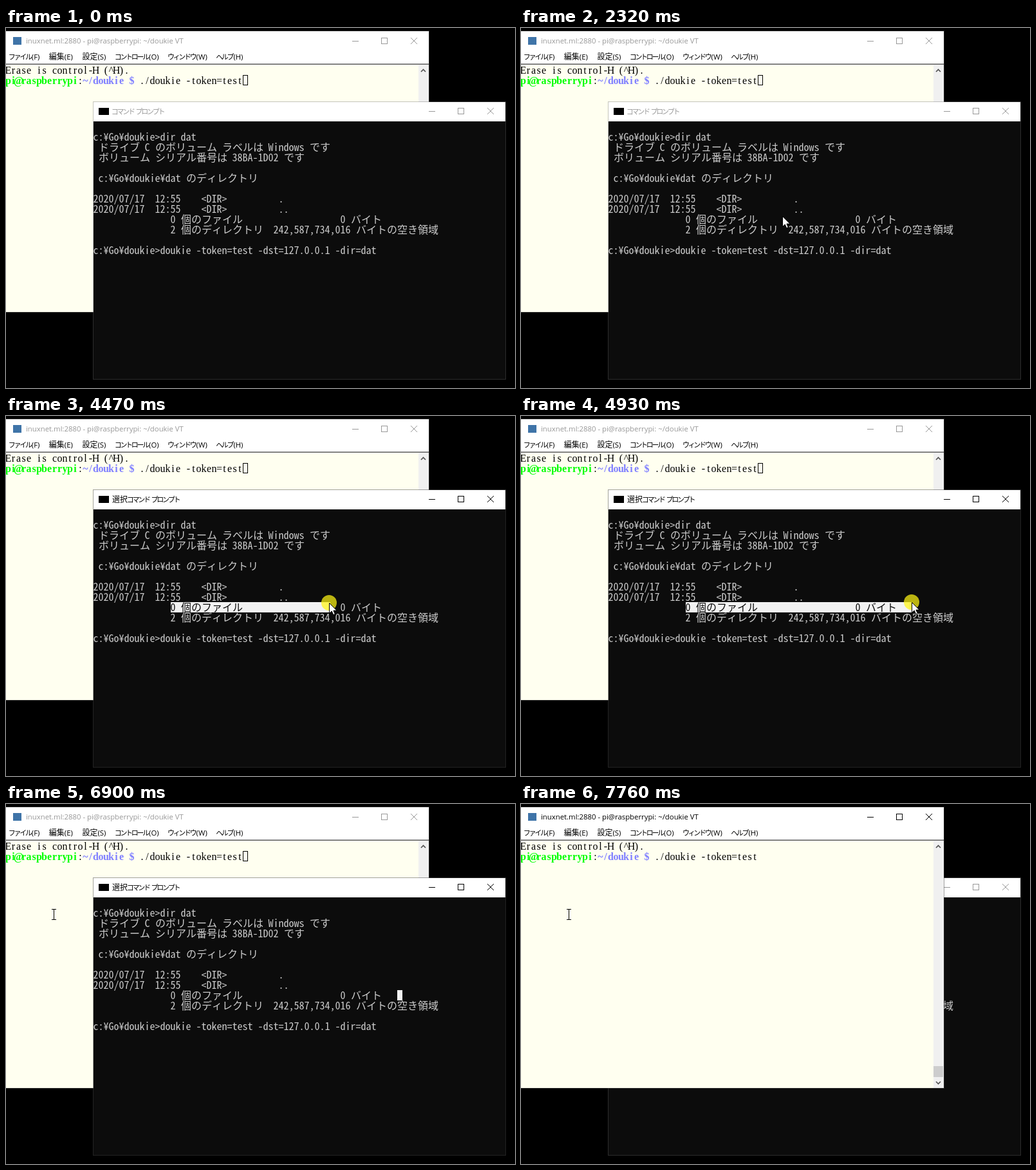
An HTML page with a canvas for the animation above (8 s loop, 791 by 559 pixels).

```html
<!DOCTYPE html>
<html lang="ja">
<head>
<meta charset="utf-8">
<title>Terminal windows</title>
<style>
html, body { margin: 0; height: 100%; overflow: hidden; background: #000; }
canvas { display: block; }
</style>
</head>
<body>
<canvas id="stage" width="791" height="559"></canvas>
<script>
const ctx = document.getElementById('stage').getContext('2d');
const LOOP = 8000, STEP = 78;
const CJK = '"Noto Sans CJK JP", "Noto Sans CJK", sans-serif';
const GOTHIC = '16px "Noto Sans Mono CJK JP", "Noto Sans CJK JP", "Noto Sans CJK", monospace';
const MINCHO = '16px "Liberation Serif", serif';
const UI = '11.35px "Open Sans", sans-serif';
const CONSOLE = { x: 136, y: 145 };
const FILE_ROW = 9;

const lines = [
  '',
  'c:¥Go¥doukie>dir dat',
  ' ドライブ C のボリューム ラベルは Windows です',
  ' ボリューム シリアル番号は 38BA-1D02 です',
  '',
  ' c:¥Go¥doukie¥dat のディレクトリ',
  '',
  '2020/07/17  12:55    <DIR>          .',
  '2020/07/17  12:55    <DIR>          ..',
  '               0 個のファイル                   0 バイト',
  '               2 個のディレクトリ  242,587,734,016 バイトの空き領域',
  '',
  'c:¥Go¥doukie>doukie -token=test -dst=127.0.0.1 -dir=dat'
];

const linear = u => u;
const smooth = u => u * u * (3 - 2 * u);
const glide = u => 1 - (1 - u) ** 1.45;

// Each move leads on from the one before; bow swings the path sideways
const moves = [
  { at: 380, steps: 11, to: [458, 304], bow: -125 },
  { at: 1230, steps: 1, to: [457, 303] },
  { at: 1400, steps: 11, to: [400, 292], bow: -85 },
  { at: 2240, steps: 5, to: [417, 292] },
  { at: 3420, steps: 5, to: [257, 293], ease: linear },
  { at: 4230, steps: 7, to: [604, 289], ease: glide },
  { at: 4930, steps: 2, to: [609, 289] },
  { at: 6590, steps: 5, to: [74, 171] }
];
const presses = [[2850, 3020], [4230, 5420], [6120, 6270], [7130, 7300]];

function pointerAt(t) {
  let pos = null, from = [501, 487];
  for (const { at, steps, to, bow = 0, ease = smooth } of moves) {
    if (t < at) break;
    const done = Math.floor((t - at) / STEP + .02) + 1;
    const u = ease(Math.min(1, done / steps));
    const swing = bow * Math.sin(Math.PI * u) ** 2;
    pos = from.map((v, i) => Math.round(v + (to[i] - v) * u + (i ? 0 : swing)));
    from = to;
  }
  return pos;
}

function box(x, y, w, h, color) {
  ctx.fillStyle = color;
  ctx.fillRect(x, y, w, h);
}

function outline(x, y, w, h, color) {
  ctx.strokeStyle = color;
  ctx.lineWidth = 1;
  ctx.strokeRect(x + .5, y + .5, w - 1, h - 1);
}

function trace(path, color, width = 1) {
  ctx.strokeStyle = color;
  ctx.lineWidth = width;
  ctx.stroke(new Path2D(path));
}

// Terminal text: 8 pixel cells, wide characters take two
function cells(text, x, y, font, color) {
  ctx.font = font;
  ctx.fillStyle = color;
  ctx.textAlign = 'center';
  for (const ch of text) {
    const wide = ch >= '\u3000';
    if (ch !== ' ') ctx.fillText(ch, x + (wide ? 8 : 3.5), y + 14);
    x += wide ? 16 : 8;
  }
}

// Interface text with narrow kana; returns where it ends
function label(text, x, y, color) {
  ctx.fillStyle = color;
  for (const run of text.match(/[\u3000-\u9fff]|[^\u3000-\u9fff]+/g)) {
    if (run < '\u3000') {
      ctx.font = UI;
      ctx.textAlign = 'left';
      ctx.fillText(run, x, y);
      x += ctx.measureText(run).width;
    } else {
      const kanji = run > '\u4e00', w = kanji ? 12 : 8.7;
      ctx.font = (kanji ? 12 : 11) + 'px ' + CJK;
      ctx.textAlign = 'center';
      ctx.fillText(run, x + w / 2, y);
      x += w;
    }
  }
  return x;
}

function buttons(right, y, color) {
  const x = right - 28, top = y - 5;
  box(x - 91, y, 10, 1, color);
  outline(x - 46, top, 10, 10, color);
  trace(`M${x} ${top}l10 10m0-10l-10 10`, color);
}

const chevron = (y, dir) =>
  trace(`M645 ${y + 2 * dir}l3.5 ${-3.5 * dir}l3.5 ${3.5 * dir}`, '#505050', 1.6);

function frame(x, y, w, h, active) {
  outline(x, y, w, h, active ? 'rgba(70,70,70,.5)' : 'rgba(110,110,110,.4)');
}

function drawTerminal(t, active) {
  const tint = active ? '#000' : '#999';
  frame(-1, 4, 659, 438, active);
  box(0, 5, 657, 436, '#fff');
  box(11, 14, 13, 12, '#3f74a8');
  label('inuxnet.ml:2880 - pi@raspberrypi: ~/doukie VT', 31, 24, tint);
  buttons(657, 20, tint);
  let x = 5;
  for (const item of ['ファイル(F)', '編集(E)', '設定(S)', 'コントロール(O)', 'ウィンドウ(W)', 'ヘルプ(H)'])
    x = label(item, x, 49, '#000') + 14.5;
  box(0, 55, 657, 1, '#a0a0a0');
  box(0, 56, 657, 1, '#696969');
  box(0, 57, 641, 384, '#fffff0');
  box(641, 57, 16, 384, '#f0f0f0');
  box(641, 407, 15, 17, '#cdcdcd');
  chevron(66, 1);
  chevron(433, -1);
  cells('Erase is control-H (^H).', 0, 57, MINCHO, '#000');
  cells('pi@raspberrypi', 0, 73, 'bold ' + MINCHO, '#0f0');
  cells(':', 112, 73, MINCHO, '#000');
  cells('~/doukie $', 120, 73, 'bold ' + MINCHO, '#7f7fff');
  cells('./doukie -token=test', 208, 73, MINCHO, '#000');
  if (t < 7300) outline(368, 73, 8, 16, '#000');
  else if (t < 7760) box(368, 73, 8, 16, '#000');
}

function drawSelection(from, to) {
  const x = CONSOLE.x + from * 8, y = CONSOLE.y + FILE_ROW * 16, w = (to - from) * 8;
  ctx.save();
  ctx.beginPath();
  ctx.rect(x, y, w, 16);
  ctx.clip();
  box(x, y, w, 16, '#f2f2f2');
  cells(lines[FILE_ROW], CONSOLE.x, y, GOTHIC, '#0c0c0c');
  ctx.restore();
}

function drawConsole(t, active, pointer) {
  const tint = active ? '#000' : '#999', selecting = t >= 4230;
  frame(135, 114, 642, 432, active);
  box(136, 115, 640, 30, '#fff');
  box(136, 145, 640, 400, '#0c0c0c');
  box(144, 124, 16, 11, '#000');
  label((selecting ? '選択' : '') + 'コマンド プロンプト', 165, 133.5, tint);
  buttons(776, 129, tint);
  lines.forEach((s, row) => cells(s, CONSOLE.x, CONSOLE.y + row * 16, GOTHIC, '#ccc'));
  if (t >= 6120) drawSelection(59, 60);
  else if (selecting) drawSelection(15, Math.floor((pointer[0] - CONSOLE.x) / 8) + 1);
}

function drawPointer([x, y], pressed) {
  if (pressed) {
    ctx.beginPath();
    ctx.arc(x, y, 12, 0, 7);
    ctx.fillStyle = 'rgba(255,245,20,.72)';
    ctx.fill();
  }
  if (x < CONSOLE.x) {
    trace(`M${x - 3} ${y - 7.5}h7m-3.5 0v16m-3.5 0h7`, '#000');
    return;
  }
  ctx.save();
  ctx.translate(x + .5, y + .5);
  const arrow = 'M0 0V16L3.7 12.5L6.2 18.2L8.8 17L6.4 11.6H11.5Z';
  ctx.fillStyle = '#fff';
  ctx.fill(new Path2D(arrow));
  trace(arrow, '#000');
  ctx.restore();
}

function draw() {
  const t = performance.now() % LOOP, pointer = pointerAt(t), terminalFront = t >= 7130;
  box(0, 0, 791, 559, '#000');
  const windows = [
    () => drawTerminal(t, terminalFront),
    () => drawConsole(t, t >= 2850 && !terminalFront, pointer)
  ];
  if (terminalFront) windows.reverse();
  windows.forEach(paint => paint());
  if (pointer) drawPointer(pointer, presses.some(([a, b]) => t >= a && t < b));
  requestAnimationFrame(draw);
}
requestAnimationFrame(draw);
</script>
</body>
</html>
```
